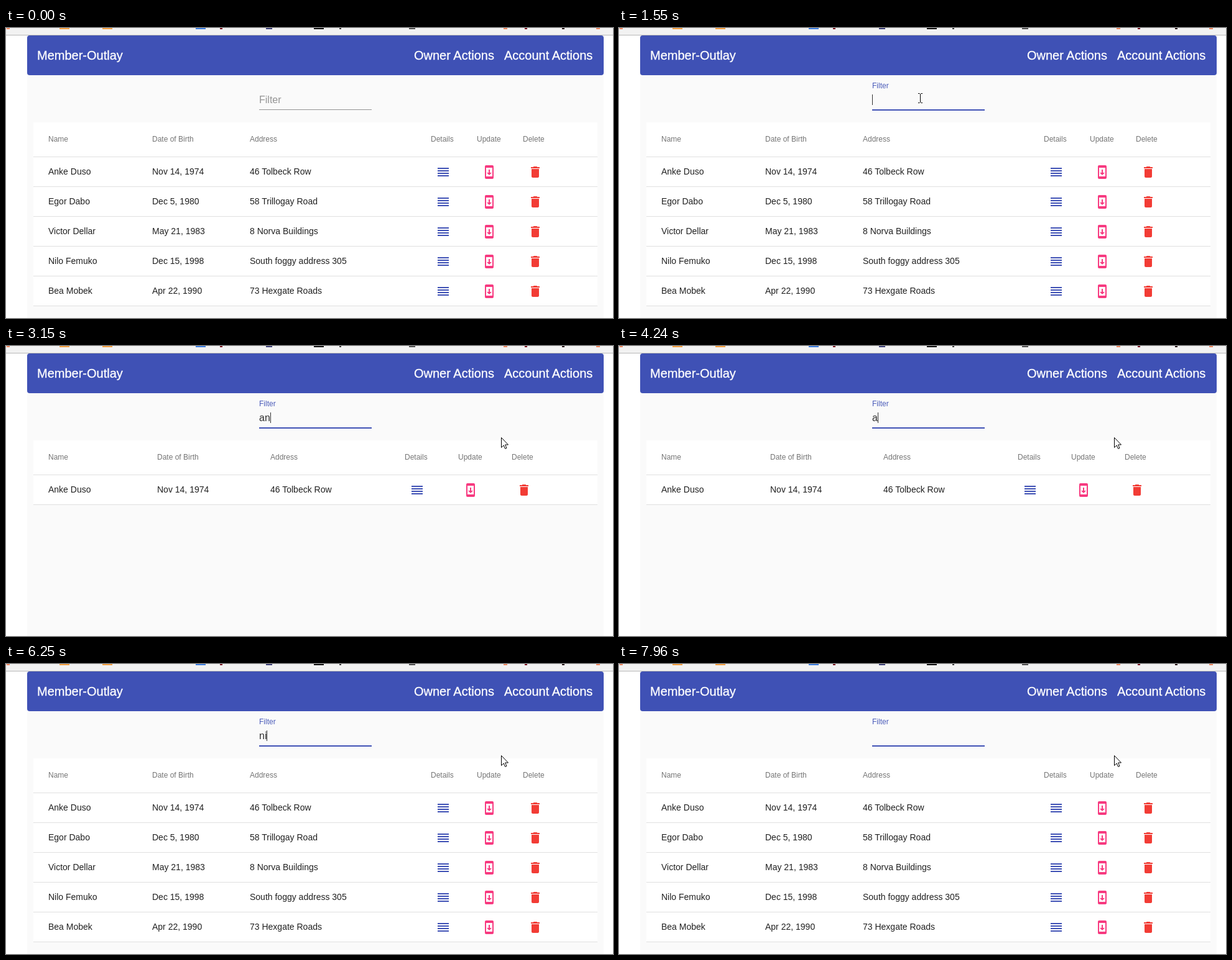
Recreate the animation shown at these times as an HTML page. Size 976 by 467 pixels, loop 8 s.

```html
<!DOCTYPE html>
<html lang="en">
<head>
<meta charset="utf-8">
<title>Filtered table</title>
<style>
  html, body { margin: 0; width: 100%; height: 100%; overflow: hidden; background: #fff; }
  svg { display: block; width: 100%; height: 100%; font-family: "Liberation Sans", Arial, sans-serif; }

  .bar { font-size: 20px; fill: #fff; stroke: #fff; stroke-width: .3px; }
  .head { font-size: 12px; fill: #757575; }
  .cell { font-size: 14px; fill: #212121; }
  .typed, #label { font-size: 16px; }
  .typed { fill: #303030; }

  .loop { animation: 8s step-end infinite; }
  #all { animation-name: all; }
  #first { animation-name: first; }
  #fourth { animation-name: fourth; }
  #a { animation-name: a; }
  #an { animation-name: an; }
  #n { animation-name: n; }
  #ni { animation-name: ni; }
  #nic { animation-name: nic; }
  #caret { animation-name: caret; }
  #cursor { animation-name: cursor; }
  #arrow { animation-name: arrow; }
  #beam { animation-name: beam; }
  #label { animation-name: label; }
  #line { animation-name: line; transform-origin: 497.5px 132px; }

  /* table versions */
  @keyframes all {
    0%, 53.875%, 93.875% { visibility: visible }
    39.375%, 79.375% { visibility: hidden }
  }
  @keyframes first {
    0%, 53.875% { visibility: hidden }
    39.375% { visibility: visible }
  }
  @keyframes fourth {
    0%, 93.875% { visibility: hidden }
    79.375% { visibility: visible }
  }

  /* typing */
  @keyframes a { 0%, 54.875% { visibility: hidden } 38.375% { visibility: visible } }
  @keyframes an { 0%, 53% { visibility: hidden } 39.375% { visibility: visible } }
  @keyframes n { 0%, 94.875% { visibility: hidden } 77.25% { visibility: visible } }
  @keyframes ni { 0%, 92.875% { visibility: hidden } 78.125% { visibility: visible } }
  @keyframes nic { 0%, 90.75% { visibility: hidden } 80.25% { visibility: visible } }
  @keyframes caret {
    0%, 21.875%, 35.5%, 59.625%, 72.25%, 99.5%, 100% { opacity: 0; transform: none }
    15.25%, 28.625%, 54.875%, 65.375%, 94.875% { opacity: 1; transform: none }
    38.375%, 53%, 77.25%, 92.875% { opacity: 1; transform: translateX(9px) }
    39.375%, 52% { opacity: 1; transform: translateX(18px) }
    46.25%, 86% { opacity: 0; transform: none }
    78.125% { opacity: 1; transform: translateX(12px) }
    80.25% { opacity: 1; transform: translateX(20px) }
  }

  /* pointer */
  @keyframes cursor {
    0% { opacity: 0; transform: translate(741px, 305px) }
    5.5% { opacity: 1; transform: translate(741px, 305px); animation-timing-function: steps(4) }
    9.375% { opacity: 1; transform: translate(541px, 161px); animation-timing-function: steps(3) }
    12.375% { opacity: 1; transform: translate(448px, 113px) }
    18.5% { opacity: 1; transform: translate(466px, 113px) }
    19.375% { opacity: 1; transform: translate(484px, 113px); animation-timing-function: steps(4) }
    22.875%, 100% { opacity: 1; transform: translate(796px, 147px) }
  }
  @keyframes arrow {
    0%, 21.125% { visibility: visible }
    11.375% { visibility: hidden }
  }
  @keyframes beam {
    0%, 21.125% { visibility: hidden }
    11.375% { visibility: visible }
  }

  /* field focus */
  @keyframes label {
    0% { fill: #949494; transform: translate(407px, 120.5px) }
    15.25% {
      fill: #949494; transform: translate(407px, 120.5px) scale(1);
      animation-timing-function: cubic-bezier(.25, .8, .25, 1);
    }
    19.375%, 100% { fill: #4c5dba; transform: translate(407px, 97px) scale(.75) }
  }
  @keyframes line {
    0% { opacity: 0; transform: scaleX(.5) }
    15.25% {
      opacity: 0; transform: scaleX(.5);
      animation-timing-function: cubic-bezier(.25, .8, .25, 1);
    }
    19%, 100% { opacity: 1; transform: scaleX(1) }
  }
</style>
</head>
<body>
<svg viewBox="0 0 976 467">
  <defs>
    <path id="details" fill="#3f51b5" d="M3 15h18v-2H3zM3 19h18v-2H3zM3 11h18V9H3zM3 5v2h18V5z"/>
    <path id="update" fill="#f73a80" d="M17 1H7c-1.1 0-2 .9-2 2v18c0 1.1.9 2 2 2h10c1.1 0 2-.9 2-2V3c0-1.1-.9-2-2-2zM17 19H7V5h10zM16 13h-3V8h-2v5H8l4 4z"/>
    <path id="delete" fill="#f23c35" d="M6 19c0 1.1.9 2 2 2h8c1.1 0 2-.9 2-2V7H6zM19 4h-3.5l-1-1h-5l-1 1H5v2h14z"/>
  </defs>

  <rect width="976" height="11" fill="#f2f2f2"/>
  <g id="tabs"></g>
  <rect y="11" width="976" height="1" fill="#b8b8b8"/>

  <rect x="34" y="72" width="927" height="395" fill="#fafafa"/>
  <rect x="34" y="12" width="927" height="64" rx="4" fill="#3f51b5"/>
  <g class="bar">
    <text x="50" y="51">Member-Outlay</text>
    <text x="656" y="51">Owner Actions</text>
    <text x="801" y="51">Account Actions</text>
  </g>

  <g id="all" class="loop"></g>
  <g id="first" class="loop"></g>
  <g id="fourth" class="loop"></g>

  <rect x="407" y="131" width="181" height="1" fill="#949494"/>
  <rect id="line" class="loop" x="407" y="131" width="181" height="2" fill="#3f51b5"/>
  <text id="label" class="loop">Filter</text>
  <text id="a" class="typed loop" x="407" y="121">a<tspan id="an" class="loop">n</tspan></text>
  <text id="n" class="typed loop" x="407" y="121">n<tspan id="ni" class="loop">i</tspan><tspan id="nic" class="loop">c</tspan></text>
  <rect id="caret" class="loop" x="407" y="107" width="1" height="17" fill="#333"/>

  <g id="cursor" class="loop">
    <path id="arrow" class="loop" fill="#fff" stroke="#000" d="M.5.5V16.5L4.2 13 6.6 18.4 9 17.4 6.6 12H11.5Z"/>
    <path id="beam" class="loop" fill="none" stroke="#000" d="M-3-7.5H-.5M1.5-7.5H4M.5-7V7M-3 7.5H-.5M1.5 7.5H4"/>
  </g>
</svg>
<script>
  const people = [
    ["Anke Duso", "Nov 14, 1974", "46 Tolbeck Row"],
    ["Egor Dabo", "Dec 5, 1980", "58 Trillogay Road"],
    ["Victor Dellar", "May 21, 1983", "8 Norva Buildings"],
    ["Nilo Femuko", "Dec 15, 1998", "South foggy address 305"],
    ["Bea Mobek", "Apr 22, 1990", "73 Hexgate Roads"]
  ];
  const heads = ["Name", "Date of Birth", "Address", "Details", "Update", "Delete"];
  const icons = ["details", "update", "delete"];
  const wide = [68, 235, 392, 683, 757, 831];
  const narrow = [68, 243, 425, 641, 727, 813];

  const text = (cls, x, y, s) => `<text class="${cls}" x="${x}" y="${y}">${s}</text>`;
  const rect = (x, y, w, h, fill) =>
    `<rect x="${x}" y="${y}" width="${w}" height="${h}" fill="${fill}"/>`;
  const put = (id, html) => { document.getElementById(id).innerHTML = html; };
  const rule = y => rect(44, y, 907, 1, "#e0e0e0");

  function table(id, rows, cols) {
    let out = rect(44, 152, 907, 56 + rows.length * 48, "#fff") + rule(207);
    heads.forEach((h, i) => out += text("head", cols[i], 183, h));
    rows.forEach((row, r) => {
      const y = 208 + r * 48;
      row.forEach((s, i) => out += text("cell", cols[i], y + 28, s));
      icons.forEach((name, i) => out += `<use href="#${name}" x="${cols[i + 3] + 8}" y="${y + 12}"/>`);
      out += rule(y + 47);
    });
    put(id, out);
  }

  table("all", people, wide);
  table("first", [people[0]], narrow);
  table("fourth", [people[3]], wide);

  // lower edges of the bookmark icons
  put("tabs", [
    [1, 5, "#ef8a62"], [86, 16, "#f5a142"], [155, 16, "#f5a142"], [305, 16, "#3f7fe0"],
    [344, 4, "#7c1626"], [418, 10, "#41447c"], [495, 16, "#151515"], [536, 3, "#444"],
    [648, 10, "#555"], [800, 6, "#ef8a62"], [834, 4, "#7c1626"], [894, 4, "#2a1518"], [949, 6, "#ef8a62"]
  ].map(([x, w, c]) => rect(x, 0, w, 2, c)).join(""));
</script>
</body>
</html>
```
